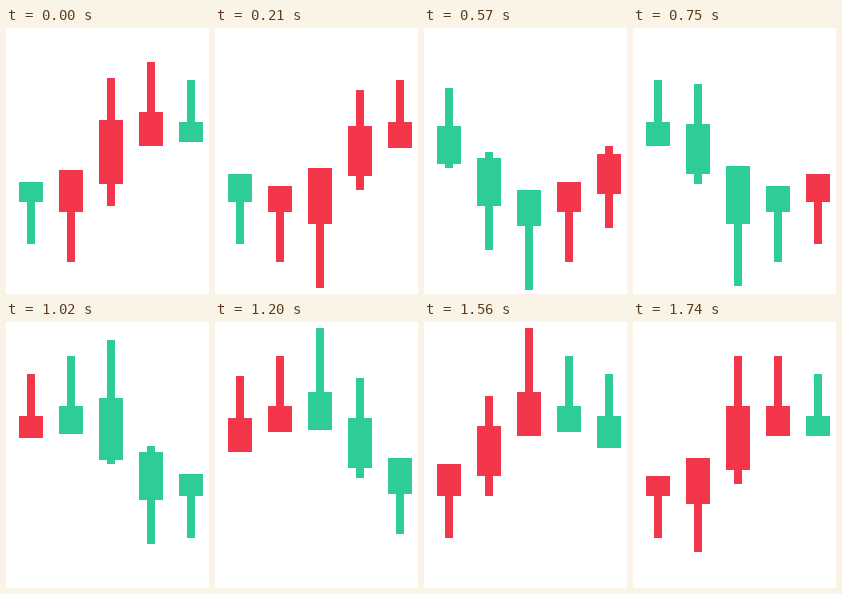
Recreate the animation shown at these times as an HTML page. Size 203 px wide and 266 px high, loop 1.77 s.

```html
<!DOCTYPE html>
<html lang="en">
<head>
<meta charset="utf-8">
<title>Candlestick loader</title>
<style>
  html, body { margin: 0; width: 100%; height: 100%; overflow: hidden; background: #fff; }
  svg { display: block; width: 203px; height: 266px; }
</style>
</head>
<body>
<svg id="chart" viewBox="0 0 203 266" shape-rendering="crispEdges"></svg>
<script>
const LOOP = 1770, STEP = 30, LAG = 225, TRAVEL = 885;
const FALL_AT = 919, FLIP_AT = 905;
const MID = 134;
const GREEN = '#2dcc99', RED = '#f4364a';
const spans = [80, 100, 128, 100, 80];

const chart = document.getElementById('chart');

function addRect(x, width) {
  const rect = document.createElementNS('http://www.w3.org/2000/svg', 'rect');
  rect.setAttribute('x', x);
  rect.setAttribute('width', width);
  return chart.appendChild(rect);
}

const candles = spans.map((span, i) => ({
  span,
  delay: i * LAG,
  wick: addRect(21 + 40 * i, 8),
  body: addRect(13 + 40 * i, 24)
}));

// cubic-bezier(.42, 0, .58, 1)
function easeInOut(x) {
  if (x <= 0) return 0;
  if (x >= 1) return 1;
  let lo = 0, hi = 1, s;
  for (let n = 0; n < 24; n++) {
    s = (lo + hi) / 2;
    const bx = 3 * s * (1 - s) * (0.42 * (1 - s) + 0.58 * s) + s ** 3;
    if (bx < x) lo = s; else hi = s;
  }
  return s * s * (3 - 2 * s);
}

// Minimum with a rounded corner
function softMin(a, b) {
  const k = 0.12, h = Math.max(k - Math.abs(a - b), 0) / k;
  return Math.min(a, b) - h * h * k / 4;
}

// Edges are fractions of a window centred on MID, kept on a 2px grid
function place(rect, span, from, to, fill) {
  const y0 = MID - span / 2;
  const top = 2 * Math.ceil((y0 + span * from) / 2 - 0.5);
  const bottom = 2 * Math.floor((y0 + span * to) / 2 + 0.5);
  rect.setAttribute('y', top);
  rect.setAttribute('height', bottom - top);
  rect.setAttribute('fill', fill);
}

function draw(time) {
  for (const { span, delay, wick, body } of candles) {
    const p = (time - delay + LOOP) % LOOP;
    const rising = p < FLIP_AT;
    const c = rising
      ? 1 - easeInOut((p - 10) / TRAVEL)
      : easeInOut((p - FALL_AT) / TRAVEL);
    const from = 1 - softMin(1.25 - c, 1);
    const to = softMin(c + 0.25, 1);
    const fill = rising ? GREEN : RED;
    place(wick, span * 2 + (span === 80 ? 4 : 0), from, to, fill);
    place(body, span, from, to, fill);
  }
}

const start = performance.now();

function tick() {
  const time = (performance.now() - start) % LOOP;
  draw(Math.floor(time / STEP) * STEP);
  requestAnimationFrame(tick);
}

draw(0);
requestAnimationFrame(tick);
</script>
</body>
</html>
```
